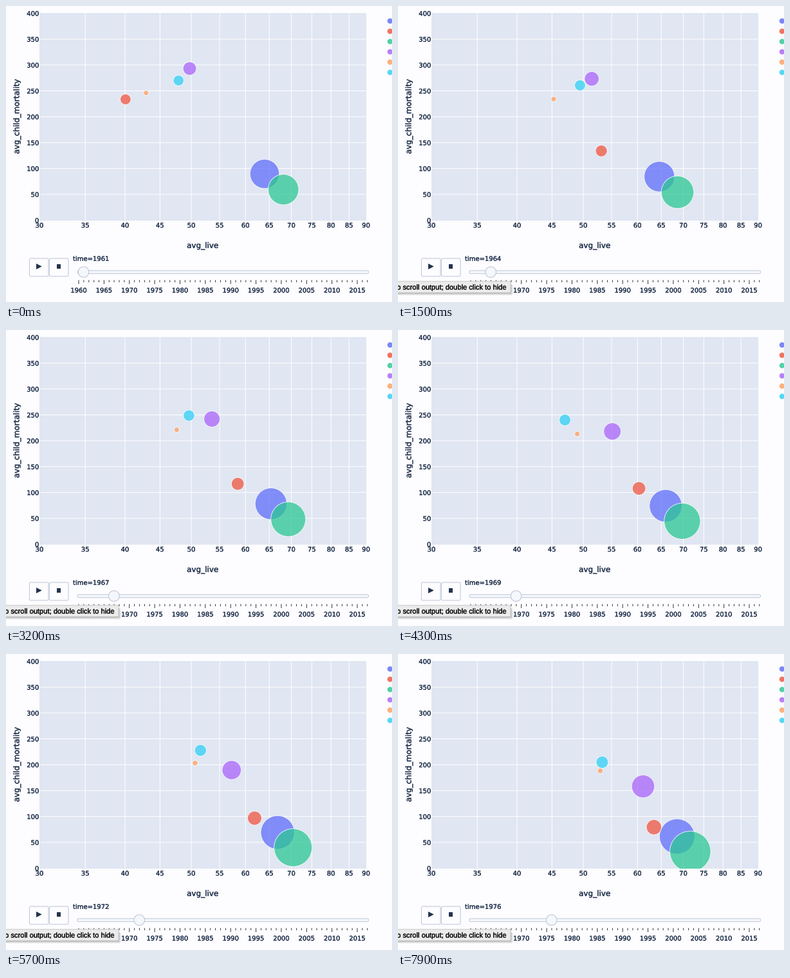
A matplotlib script for the animation above (8 s loop, 600x462 px).

```python
import numpy as np
import matplotlib.pyplot as plt
from matplotlib.animation import FuncAnimation
from matplotlib.patches import Circle, FancyBboxPatch, Polygon, Rectangle
from matplotlib.patheffects import withStroke

W, H, DPI = 600, 462, 100
PT = 72 / DPI
FRAMES, STEP = 80, 100
YEAR_MS, LEAD_MS, GLIDE_MS = 510, 240, 150
TIP_MS = 1400

INK, EDGE, PAPER = "#23344f", "#bcc8d9", "#fdfcfe"
LEFT, RIGHT, TOP, BOTTOM = 52, 559.6, 11.3, 334.3
ALPHA = 0.74

plt.rcParams["font.family"] = "DejaVu Sans"
plt.rcParams["text.hinting"] = "none"
fig = plt.figure(figsize=(W / DPI, H / DPI), dpi=DPI, facecolor=PAPER)
ax = fig.add_axes([0, 0, 1, 1])
ax.set_xlim(0, W)
ax.set_ylim(H, 0)
ax.axis("off")


def label(x, y, s, size=10, color=INK, **kw):
    kw = {"ha": "center", "va": "baseline", **kw}
    weight = withStroke(linewidth=0.3 * PT, foreground=color)
    return ax.text(x, y, s, fontsize=size * PT, color=color,
                   path_effects=[weight], **kw)


def box(x0, y0, x1, y1, radius, face, edge, z=2, lw=1, **kw):
    style = f"round,pad=0,rounding_size={radius}"
    return ax.add_patch(FancyBboxPatch(
        (x0, y0), x1 - x0, y1 - y0, boxstyle=style, fc=face, ec=edge,
        lw=lw * PT, zorder=z, **kw))


def x_px(v):
    return LEFT + (RIGHT - LEFT) * np.log(v / 30) / np.log(3)


def y_px(v):
    return BOTTOM - (BOTTOM - TOP) * v / 400


def year_px(year):
    return 113 + (year - 1960) * 7.873


# Plot panel, grid and axis text
panel = ax.add_patch(Rectangle((LEFT, TOP), RIGHT - LEFT, BOTTOM - TOP + 0.6,
                               fc="#e0e6f2", ec="none", zorder=0))
grid = dict(colors="white", lw=PT, zorder=1, snap=False)
ax.vlines(x_px(np.arange(35, 90, 5)), TOP, BOTTOM, **grid)
ax.hlines(y_px(np.arange(50, 400, 50)), LEFT, RIGHT, **grid)
for v in range(30, 95, 5):
    label(x_px(v), 345.8, str(v))
for v in range(0, 401, 50):
    label(51.3, y_px(v) + 4, str(v), ha="right")
label(305.7, 377.7, "avg_live", 12)
label(17.3, 172.5, "avg_child_mortality", 12, rotation=90, va="center")

# Play and stop buttons
for x in (36.5, 67.5):
    box(x, 394, x + 29.5, 422, 2, PAPER, EDGE)
ax.add_patch(Polygon([(47, 402), (55.8, 406.5), (47, 411)], fc=INK, zorder=3))
ax.add_patch(Rectangle((78.7, 403.4), 6.2, 6.2, fc=INK, zorder=3))

# Slider
box(111, 413, 563.5, 417.6, 2, "#f6f8fc", EDGE)
years = np.arange(1960, 2018)
ends = np.where(years % 5 == 0, 434, 431.2)
ax.vlines(year_px(years), 427.8, ends, colors="#333333", lw=PT, zorder=2,
          snap=False)
for y in years[::5]:
    label(year_px(y), 447.2, str(y))
year_text = label(104, 397.8, "", ha="left")
handle = ax.add_patch(Circle((0, 0), 8.3, fc="#f4f7fb", ec="#b9c5d7",
                             lw=PT, zorder=4))

# System tooltip with a soft shadow
tip = [box(-10, 431 + d, 174.5 + d, 447.5 + d, 2, "black", "none", 5, alpha=0.07)
       for d in (1, 2, 3, 4)]
tip.append(box(-10, 429.8, 175, 447.6, 1, "#ebebec", "#bdbdbf", 6, 0.8))
tip.append(label(168.2, 442.6, "to scroll output; double click to hide", 11.15,
                 "#111111", ha="right", family="Liberation Sans", zorder=7))

u = np.linspace(0, 1, FRAMES)


def run(start, end, drag=1):
    """Go from start to end; drag > 1 starts slowly, drag < 1 quickly."""
    return start + (end - start) * u / (drag + (1 - drag) * u)


recovery = 1 - np.exp(-u / 0.06)
dip = np.exp(-((u - 0.55) / 0.125) ** 2)
wave = np.sin(2 * np.pi * u)

# Colour, then x, y and radius over the loop
BUBBLES = [
    ("#5f6dfa", run(402, 433.8, 1.5), run(262, 284.8), run(22.8, 27.5)),
    ("#f0553f", run(185.8, 397.8, 0.147), run(145.7, 196.3) + 74 * recovery,
     run(8.3, 11.8, 0.85)),
    ("#2cc893", run(431.2, 454.3, 1.4), run(286.5, 308.3), run(23.8, 31.8)),
    ("#a964fb", run(285.5, 381, 1.2), run(97.6, 206.6) - 5 * wave,
     run(10.4, 17.8, 1.7)),
    ("#ff9f60", run(217.7, 314.4, 0.7), run(135.7, 182.2, 0.9), run(4, 4.3)),
    ("#2fcff5", run(268.2, 317.4, 0.55) - 42.5 * dip, run(116.3, 168.9, 1.4),
     run(8.2, 9.5)),
]

discs = []
for n, (color, *_) in enumerate(BUBBLES):
    disc = ax.add_patch(Circle((0, 0), 1, fc=(color, ALPHA), ec=(1, 1, 1, 0.8),
                               lw=PT, zorder=3 + n / 10))
    disc.set_clip_path(panel)
    discs.append(disc)
    ax.add_patch(Circle((597, 23.4 + 16.04 * n), 4.2, fc=(color, 0.82),
                        ec="none", zorder=3))


def ease(p):
    p = min(p, 1)
    return 4 * p ** 3 if p < 0.5 else 1 - 4 * (1 - p) ** 3


def draw(i):
    t = i * STEP
    for disc, (_, x, y, r) in zip(discs, BUBBLES):
        disc.center = x[i], y[i]
        disc.radius = r[i]
    step, since = divmod(t + LEAD_MS, YEAR_MS)
    year = 1961 + step
    year_text.set_text(f"time={year}")
    back = 1 - ease(since / GLIDE_MS)
    handle.center = year_px(year - back) - 0.3, 415.2
    for part in tip:
        part.set_visible(t >= TIP_MS)
    return discs + tip + [year_text, handle]


anim = FuncAnimation(fig, draw, frames=FRAMES, interval=STEP,
                     repeat=True, repeat_delay=0, blit=False)
plt.show()
```
